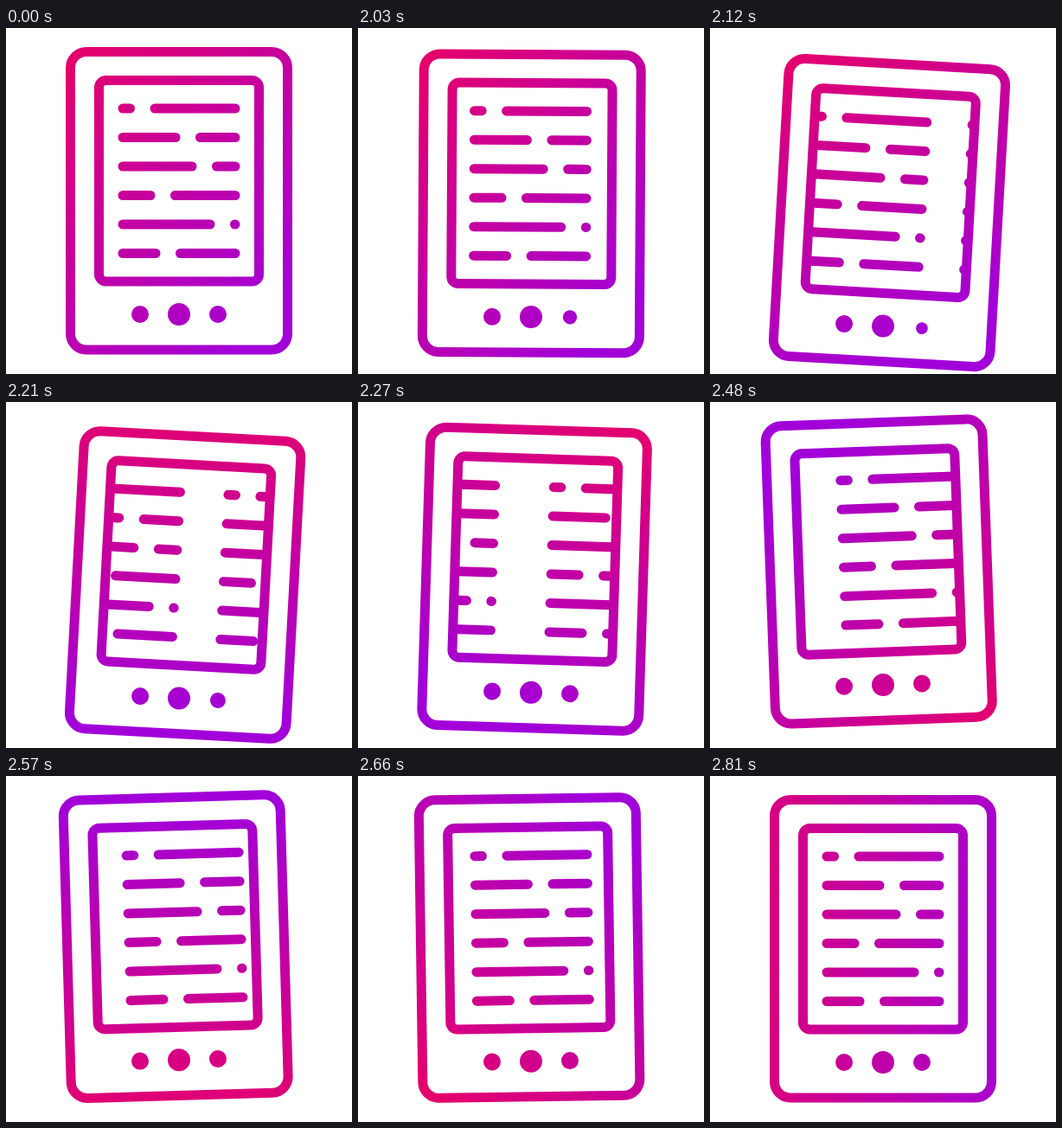
These frames come from a looping animation (400 px wide and 400 px high, 2.84 s). An HTML page with a canvas:

```html
<!DOCTYPE html>
<html lang="en">
<head>
<meta charset="utf-8">
<title>E-reader</title>
<style>
  html, body { margin: 0; width: 100%; height: 100%; overflow: hidden; background: #fff; }
  canvas { display: block; width: 400px; height: 400px; }
</style>
</head>
<body>
<canvas id="stage" width="400" height="400"></canvas>
<script>
const ctx = document.getElementById('stage').getContext('2d');
const LOOP = 2840, HOLD = 2030, STEP = 30, END = 26;
const PIVOT = { x: 200, y: 331 };
const PEN = 11;

// Each text row is two dashes split by a gap after this x
const SPLITS = [149, 201.5, 220.5, 172.5, 241.5, 178.5];
const LEFT = 129.5, RIGHT = 270.5, GAP = 17.5;

// Cosine ease from 0 to 1 between two steps
function ease(n, from, to) {
  const u = Math.min(1, Math.max(0, (n - from) / (to - from)));
  return (1 - Math.cos(Math.PI * u)) / 2;
}

// From rest to a first extreme, to a second one, and back to rest
function swing(n, start, t1, v1, t2, v2) {
  const a = ease(n, start, t1), b = ease(n, t1, t2), c = ease(n, t2, END);
  return v1 * a + (v2 - v1) * b - v2 * c;
}

// Angle of the red end, clockwise from the left
function turn(n) {
  const u = (n + 1) / (END + 1);
  return 45 + 315 * u * u * (2.5 - 1.5 * u);
}

function pose(n) {
  return {
    tilt: swing(n, -1, 4, 3.6, 14.5, -2.1),
    drop: swing(n, -1.7, 3.9, 14.5, 12, -4.4),
    press: 10 - 3.4 * (ease(n, -2, 1.8) - ease(n, 1.8, 8.5)),
    oldPage: -194 * ease(n, -1, 15.2),
    newPage: 0.061 * Math.pow(END - n, 2.5),
    turn: turn(n),
    bias: -50 * Math.exp(-(((n - 12) / 3) ** 2))
  };
}

const REST = { tilt: 0, drop: 0, press: 10, oldPage: 0, newPage: 400, turn: 45, bias: 0 };

function makePaint(angle, bias) {
  const a = angle * Math.PI / 180;
  const dx = -Math.cos(a), dy = -Math.sin(a);
  const near = 200 - bias, far = -165 - bias;
  const g = ctx.createLinearGradient(200 + dx * near, 200 + dy * near, 200 + dx * far, 200 + dy * far);
  g.addColorStop(0, '#e4006c');
  g.addColorStop(1, '#a200d8');
  return g;
}

// Paths are built in the tilted space but painted in stage space
function paint(kind) {
  ctx.save();
  ctx.setTransform(1, 0, 0, 1, 0, 0);
  ctx[kind]();
  ctx.restore();
}

function frame(x, y, w, h, r) {
  ctx.beginPath();
  ctx.roundRect(x, y, w, h, r);
  paint('stroke');
}

function dot(x, r) {
  ctx.beginPath();
  ctx.arc(x, PIVOT.y, r, 0, Math.PI * 2);
  paint('fill');
}

function page(shift) {
  const dash = (l, r, y) => {
    ctx.moveTo(l + PEN / 2 + shift, y);
    ctx.lineTo(r - PEN / 2 + shift, y);
  };
  ctx.beginPath();
  SPLITS.forEach((x, i) => {
    const y = 93 + i * 33.5;
    dash(LEFT, x, y);
    dash(x + GAP, RIGHT, y);
  });
  paint('stroke');
}

function draw(time) {
  const p = time < HOLD ? REST : pose(Math.floor((time - HOLD) / STEP));

  ctx.setTransform(1, 0, 0, 1, 0, 0);
  ctx.fillStyle = '#fff';
  ctx.fillRect(0, 0, 400, 400);
  ctx.fillStyle = ctx.strokeStyle = makePaint(p.turn, p.bias);
  ctx.lineWidth = PEN;
  ctx.lineCap = 'round';

  ctx.translate(PIVOT.x, PIVOT.y + p.drop);
  ctx.rotate(p.tilt * Math.PI / 180);
  ctx.translate(-PIVOT.x, -PIVOT.y);

  ctx.save();
  ctx.beginPath();
  ctx.rect(107.5, 60.5, 185, 232.5);
  ctx.clip();
  page(p.oldPage);
  page(p.newPage);
  ctx.restore();

  frame(74.5, 27.5, 251, 344.5, 18.5);
  frame(107.5, 60.5, 185, 232.5, 8);
  dot(155, 10);
  dot(200, 13);
  dot(245, p.press);
}

function tick() {
  draw(performance.now() % LOOP);
  requestAnimationFrame(tick);
}
tick();
</script>
</body>
</html>
```
